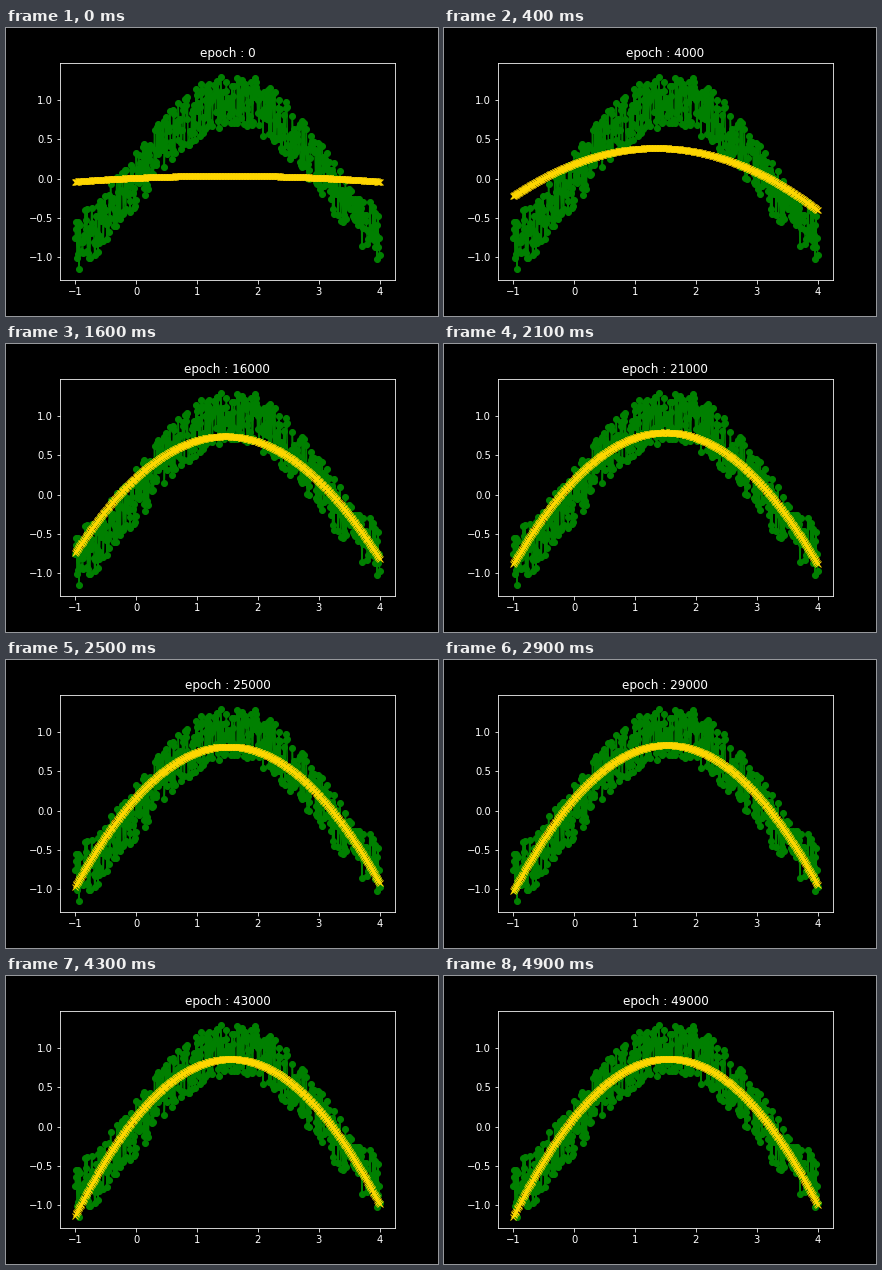
A matplotlib script for the animation above (5 s loop, 432 by 288 pixels).

```python
import numpy as np
import matplotlib.pyplot as plt
from matplotlib.animation import FuncAnimation

FRAMES = 50
INTERVAL = 100
EPOCHS_PER_FRAME = 1000
SAMPLES = 500
NOISE = 0.35

plt.style.use("dark_background")
plt.rcParams["font.family"] = "DejaVu Sans"


def noisy_sine(x):
    rng = np.random.default_rng(7)
    return np.sin(x) + rng.uniform(-NOISE, NOISE, x.size)


def fitted_curve(step, x):
    """Parabola whose end and middle values converge in a fast and a slow mode."""
    fast = np.exp(-0.195 * step)
    slow = np.exp(-0.055 * step - 0.0008 * step**2)
    left = -1.16 - 0.14 * fast + 1.26 * slow
    middle = 0.865 - 0.53 * fast - 0.30 * slow
    right = -1.0 + 0.49 * fast + 0.47 * slow
    t = (x - 1.5) / 2.5
    return middle + (right - left) / 2 * t + ((left + right) / 2 - middle) * t**2


x = np.linspace(-1, 4, SAMPLES)

fig, ax = plt.subplots(figsize=(6, 4), dpi=72)
fig.subplots_adjust(left=0.125, right=0.9, bottom=0.125, top=0.88)
ax.plot(x, noisy_sine(x), "o-", color="green")
(fit_line,) = ax.plot(x, fitted_curve(0, x), "x-", color="gold")
ax.set_xlim(-1.25, 4.25)
ax.set_ylim(-1.291, 1.476)
title = ax.set_title("epoch : 0")


def update(step):
    fit_line.set_ydata(fitted_curve(step, x))
    title.set_text(f"epoch : {step * EPOCHS_PER_FRAME}")
    return fit_line, title


anim = FuncAnimation(fig, update, frames=FRAMES, interval=INTERVAL,
                     repeat=True, repeat_delay=0)
plt.show()
```
